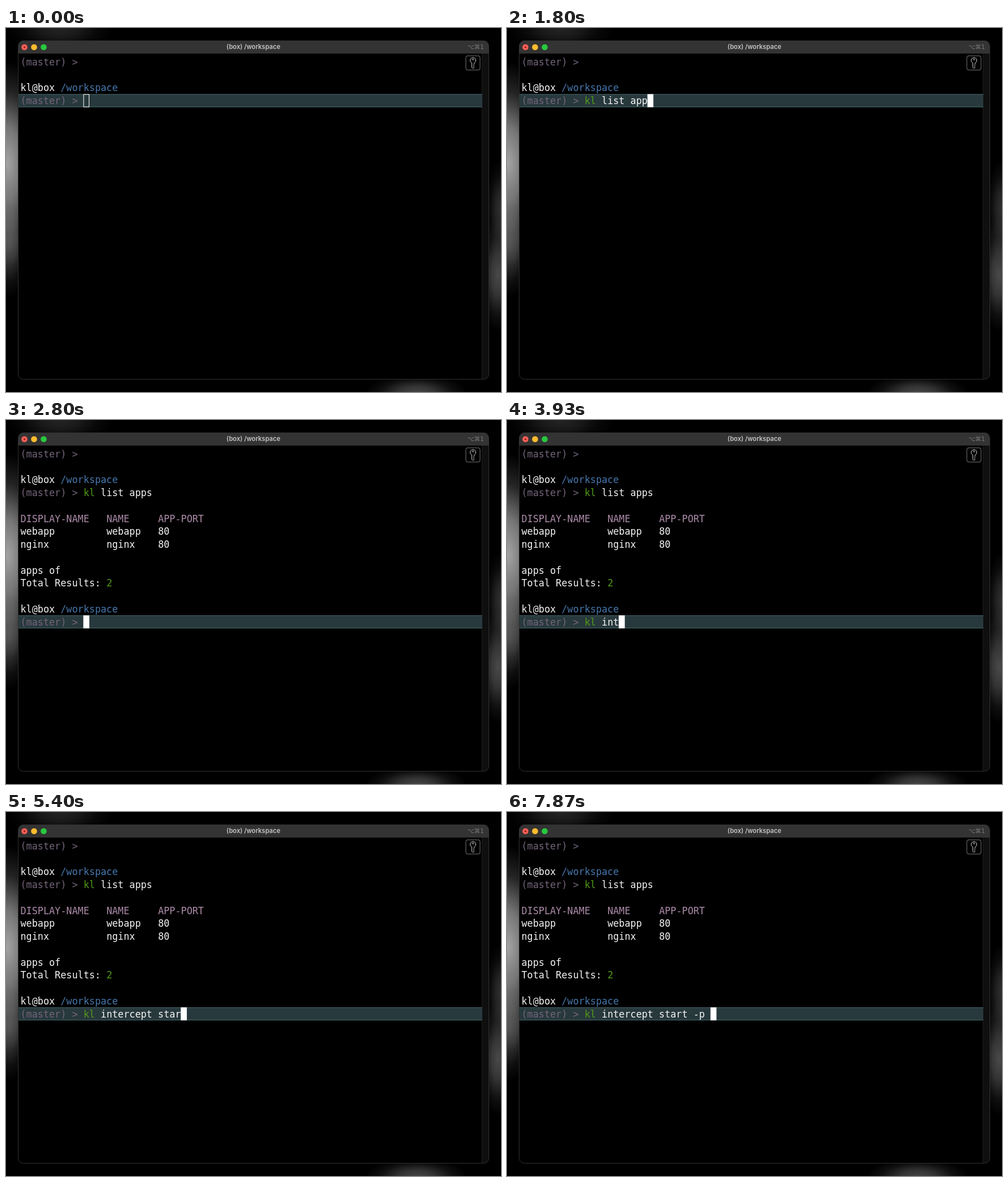
Animation, 873 px wide and 641 px high, one loop 8000 ms. Source, as an HTML page:

```html
<!DOCTYPE html>
<html lang="en">
<head>
<meta charset="utf-8">
<title>Terminal</title>
<style>
  html, body { margin: 0; width: 100%; height: 100%; overflow: hidden; background: #000; }
  svg { display: block; width: 873px; height: 641px; }
  text { white-space: pre; }
  .mono { font: 16.8px "DejaVu Sans Mono", "Noto Sans Mono", monospace; fill: #f4f4f4; }
  .title { font: 600 11.15px Inter, "Liberation Sans", sans-serif; fill: #c4c4c4; text-anchor: middle; }
  .hint { font: 10.5px "DejaVu Sans", sans-serif; fill: #7b7b7b; text-anchor: end; }
  .prompt { fill: #73647a; }
  .path { fill: #4778ae; }
  .green { fill: #519a16; }
  .head { fill: #ad8caa; }
</style>
</head>
<body>
<svg viewBox="0 0 873 641" xmlns="http://www.w3.org/2000/svg">
  <defs>
    <radialGradient id="glow">
      <stop offset="0" stop-color="#fff"/>
      <stop offset=".35" stop-color="#fff" stop-opacity=".72"/>
      <stop offset=".7" stop-color="#fff" stop-opacity=".22"/>
      <stop offset="1" stop-color="#fff" stop-opacity="0"/>
    </radialGradient>
  </defs>
  <rect width="873" height="641"/>
  <g fill="url(#glow)">
    <ellipse cx="2" cy="238" rx="75" ry="180" opacity=".64"/>
    <ellipse cx="4" cy="380" rx="42" ry="95" opacity=".27"/>
    <ellipse cx="95" cy="2" rx="95" ry="40" opacity=".14"/>
    <ellipse cx="724" cy="643" rx="90" ry="34" opacity=".28"/>
    <ellipse cx="873" cy="320" rx="28" ry="90" opacity=".19"/>
    <ellipse cx="868" cy="435" rx="36" ry="100" opacity=".29"/>
  </g>

  <rect x="21.5" y="22.5" width="830" height="596" rx="9" fill="#000"/>
  <path d="M22 45V31a8.5 8.5 0 0 1 8.5-8.5h812a8.5 8.5 0 0 1 8.5 8.5v14z" fill="#333"/>
  <path d="M840 45h11.5v565a8 8 0 0 1-8 8H840z" fill="#0f0f0f"/>
  <path d="M839.5 45V618" stroke="#1e1e1e"/>
  <rect x="21.5" y="22.5" width="830" height="596" rx="9" fill="none" stroke="#303030"/>
  <circle cx="32.5" cy="33.7" r="5.3" fill="#fe5f57"/>
  <circle cx="32.5" cy="33.7" r="1.5" fill="#7c150f"/>
  <circle cx="49.5" cy="33.7" r="5.3" fill="#febc2e"/>
  <circle cx="66.5" cy="33.7" r="5.3" fill="#28c840"/>
  <text id="title" class="title" x="436.3" y="37.2"></text>
  <text class="hint" x="843" y="36.5">⌥⌘1</text>

  <g id="band">
    <rect x="22" width="818" height="23" fill="#28393d"/>
    <path d="M22 .5H840M22 22.5H840" stroke="#456468"/>
  </g>
  <g id="screen" class="mono"></g>
  <rect id="cursor" fill="#fff" stroke="#fff"/>
  <g id="spinner" fill="#ddd"></g>

  <g fill="none" stroke="#777">
    <rect x="811" y="49" width="25" height="25" rx="3"/>
    <path d="M821.6 61.6a5 5 0 1 1 4 0V64l-1.3 1.2 1.3 1.3-1.3 1.4 1.3 1.2-2 2.2-2-2z" stroke="#d0d0d0"/>
    <circle cx="823.6" cy="55.2" r="1.2" stroke="#d0d0d0" stroke-width=".9"/>
  </g>
</svg>
<script>
  const LOOP = 8000, LEFT = 25.5, TOP = 48.2, ROW = 22.75, COL = 10.11;
  const FOCUS = 400, ENTER = 2070, RESULT = 2620;
  const FIRST = 'kl list apps', SECOND = 'kl intercept start -p ';
  const firstKeys = [600, 730, 870, 1200, 1270, 1400, 1470, 1530, 1670, 1730, 1800, 1930];
  const secondKeys = [3270, 3400, 3530, 3670, 3730, 3870, 4000, 4070, 4200, 4330, 4470,
    4600, 4730, 4930, 5070, 5200, 5330, 5470, 5600, 6130, 6330, 6530];
  // Braille dots as [column, row], in the order they go dark.
  const DOTS = [[0, 0], [0, 1], [0, 2], [0, 3], [1, 3], [1, 2], [1, 1], [1, 0]];

  const $ = id => document.getElementById(id);
  const band = $('band'), cursor = $('cursor'), spinner = $('spinner'), title = $('title');

  function make(parent, tag, attrs, content = '') {
    const node = document.createElementNS('http://www.w3.org/2000/svg', tag);
    for (const name in attrs) node.setAttribute(name, attrs[name]);
    node.textContent = content;
    return parent.appendChild(node);
  }
  const write = (parent, row, col, content, style = '') => make(parent, 'text',
    { x: LEFT + col * COL, y: TOP + row * ROW + 17.7, class: style }, content);
  const show = (node, on) => node.setAttribute('visibility', on ? 'visible' : 'hidden');
  const typed = (text, keys, t) => text.slice(0, keys.filter(k => k <= t).length);

  function prompt(parent, row) {
    write(parent, row - 1, 0, 'kl@box');
    write(parent, row - 1, 7, '/workspace', 'path');
    write(parent, row, 0, '(master) >', 'prompt');
    const name = write(parent, row, 11, '', 'green');
    const args = write(parent, row, 13, '');
    return text => {
      name.textContent = text.slice(0, 2);
      args.textContent = text.slice(2);
    };
  }

  const screen = $('screen');
  write(screen, 0, 0, '(master) >', 'prompt');
  const setFirst = prompt(screen, 3);
  const loading = write(screen, 4, 2, 'loading please wait...');

  const result = make(screen, 'g', {});
  [['DISPLAY-NAME', 'NAME', 'APP-PORT'], ['webapp', 'webapp', '80'], ['nginx', 'nginx', '80']]
    .forEach((cells, i) => cells.forEach((cell, j) =>
      write(result, 5 + i, [0, 15, 24][j], cell, i ? '' : 'head')));
  write(result, 9, 0, 'apps of');
  write(result, 10, 0, 'Total Results:');
  write(result, 10, 15, '2', 'green');
  const setSecond = prompt(result, 13);

  const dots = DOTS.map(([x, y]) =>
    make(spinner, 'circle', { cx: 28.4 + x * 4.4, cy: 146.6 + y * 4, r: 0.9 }));

  function placeCursor(row, col, solid) {
    const y = TOP + row * ROW;
    band.setAttribute('transform', `translate(0 ${y})`);
    cursor.setAttribute('x', LEFT + (11 + col) * COL + 0.2);
    cursor.setAttribute('y', y + 0.5);
    cursor.setAttribute('width', 9.6);
    cursor.setAttribute('height', 22);
    cursor.setAttribute('fill', solid ? '#fff' : 'none');
  }

  function render(t) {
    const busy = t >= ENTER && t < RESULT, done = t >= RESULT;
    const first = typed(FIRST, firstKeys, t), second = typed(SECOND, secondKeys, t);
    setFirst(first);
    setSecond(second);
    title.textContent = busy ? '(box) workspace: kl list apps' : '(box) /workspace';
    [loading, spinner].forEach(node => show(node, busy));
    [band, cursor].forEach(node => show(node, !busy));
    show(result, done);
    placeCursor(done ? 13 : 3, (done ? second : first).length, t >= FOCUS);
    const dark = Math.floor((t - ENTER) / 100) & 7;
    dots.forEach((dot, i) => dot.setAttribute('opacity', i === dark ? 0 : 1));
  }

  const start = performance.now();
  function tick() {
    render((performance.now() - start) % LOOP);
    requestAnimationFrame(tick);
  }
  tick();
</script>
</body>
</html>
```
